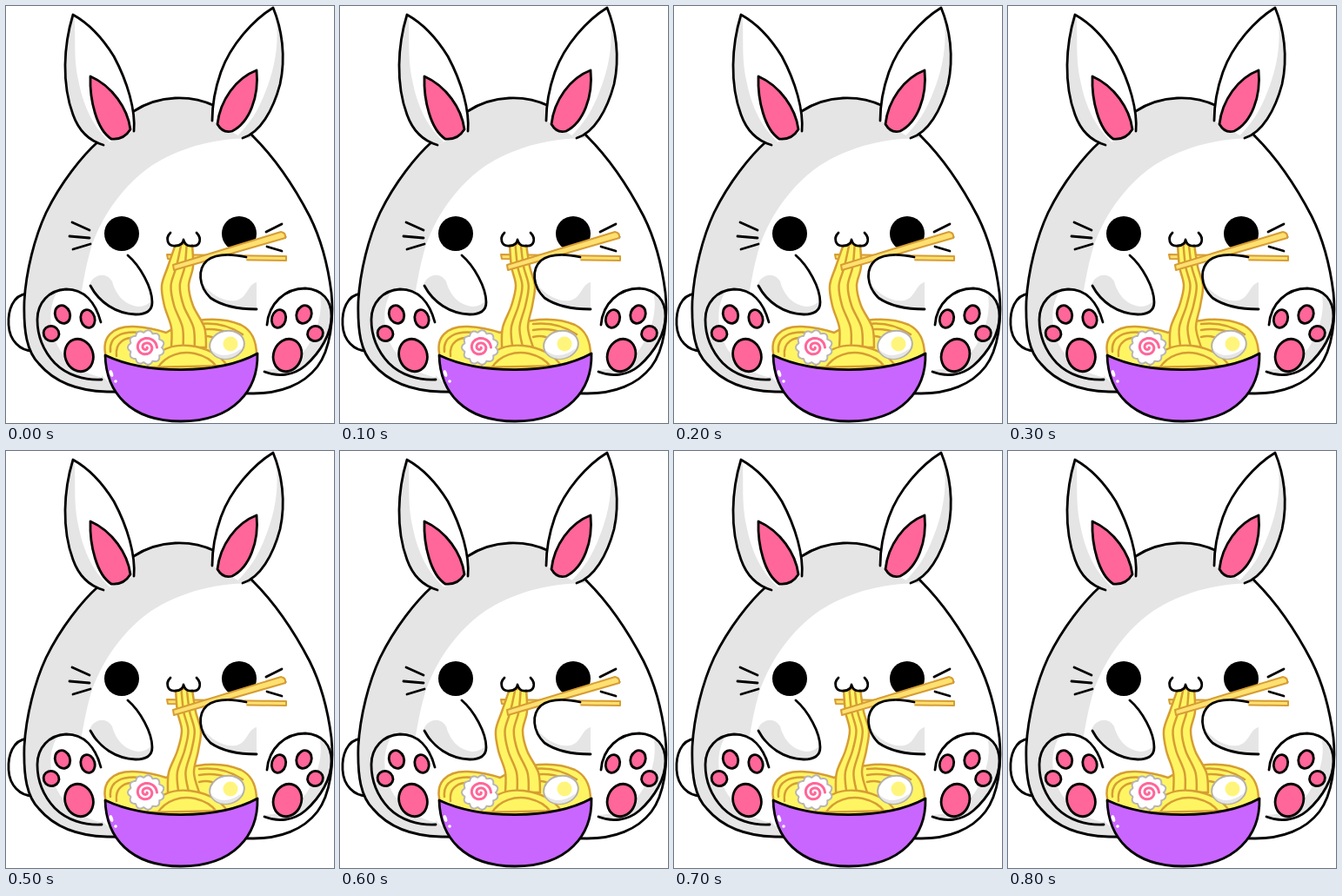
Recreate the animation shown at these times as an HTML page. Size 377 px wide and 480 px high, loop 900 ms.

```html
<!DOCTYPE html>
<html lang="en">
<head>
<meta charset="utf-8">
<title>Bunny eating noodles</title>
<style>
  html, body { margin: 0; width: 100%; height: 100%; overflow: hidden; background: #fff; }
  svg { display: block; width: 100vw; height: 100vh; }
  .ink { stroke: #000; stroke-width: 2.8; stroke-linecap: round; stroke-linejoin: round; }
  .line { fill: none; }
  .white { fill: #fff; }
  .shade { fill: #e5e5e5; }
  .pink { fill: #ff6699; }
  .gold { stroke: #d69d33; stroke-width: 2.5; stroke-linecap: round; stroke-linejoin: round; }
  .pasta { fill: #fff563; }
  .wood { fill: #ffe070; stroke-width: 2; }
</style>
</head>
<body>
<svg viewBox="0 0 377 480">
  <defs>
    <path id="body" d="M106 156 C119 143 132 130 147 121 C176 102 213 102 240 115 C258 123 272 136 284 150 C314 180 336 217 349 242 C362 268 370 298 374 330 C377 360 373 395 358 415 C342 436 315 446 284 446 L116 444 C80 443 55 432 38 412 C24 398 20 375 21 340 C23 305 33 266 46 238 C63 203 88 172 106 156Z"/>
    <path id="earL" d="M112 160 C95 155 83 142 77 125 C64 90 66 46 77 10 C95 20 111 37 124 58 C140 88 149 120 147 144"/>
    <path id="earR" d="M237 132 C237 116 240 96 247 76 C258 45 284 16 307 2 C317 26 322 58 315 90 C307 120 292 146 272 152"/>
    <path id="footL" d="M109 364 C103 341 90 326 69 326 C49 327 36 342 36 361 C36 382 43 397 56 411 C70 425 90 431 110 430"/>
    <path id="footR" d="M300 367 C302 342 321 325 344 325 C364 326 374 339 374 357 C374 377 362 398 344 414 C330 426 312 427 297 421"/>
    <path id="bowl" d="M114 402 C160 424 243 425 289 400 C290 442 262 478 201 478 C143 478 115 445 114 402Z"/>
    <path id="armL" d="M140 287 C154 299 168 324 168 341 C168 351 161 355 149 355 C126 354 107 341 97 322"/>
    <path id="armR" d="M276 289 C262 286 243 284 231 293 C220 303 221 322 235 336 C248 345 268 349 288 349"/>
    <clipPath id="inBody"><use href="#body"/></clipPath>
    <clipPath id="inEarL"><use href="#earL"/></clipPath>
    <clipPath id="inEarR"><use href="#earR"/></clipPath>
    <clipPath id="inFootL"><use href="#footL"/></clipPath>
    <clipPath id="inFootR"><use href="#footR"/></clipPath>
  </defs>

  <!-- tail and body -->
  <path class="ink white" d="M24 331 C8 333 2 350 3 367 C4 385 16 397 31 397"/>
  <use href="#body" class="white"/>
  <path class="shade" clip-path="url(#inBody)" d="M0 90 H300 V153 C246 149 202 162 167 184 C128 211 104 254 96 285 C91 303 88 322 84 345 C84 385 98 420 125 438 V450 H0Z"/>
  <use href="#body" class="ink line"/>

  <!-- ears -->
  <use href="#earL" class="white"/>
  <path class="shade" clip-path="url(#inEarL)" d="M77 5 C82 20 76 53 83 85 C89 116 101 143 126 162 H55 V5Z"/>
  <path class="ink pink" d="M97 81 C96 108 104 142 121 153 C130 154 138 150 143 142 C140 118 122 92 97 81Z"/>
  <use href="#earL" class="ink line"/>
  <use href="#earR" class="white"/>
  <path class="shade" clip-path="url(#inEarR)" d="M308 0 C316 35 310 70 298 99 C290 121 278 139 261 154 H330 V0Z"/>
  <path class="ink pink" d="M288 74 C264 83 246 109 243 136 C247 143 253 146 260 144 C280 134 291 104 288 74Z"/>
  <use href="#earR" class="ink line"/>

  <!-- face -->
  <path class="ink line" d="M76 249 L96 258 M73 265 L96 267 M77 280 L97 274 M299 260 L317 251 M300 268 L321 266 M300 277 L317 282"/>
  <g id="open"><circle cx="133" cy="262" r="20"/><circle cx="268" cy="262" r="20"/></g>
  <path id="shut" fill="none" stroke="#000" stroke-width="5" stroke-linecap="round" d="M114 263 Q133 249 153 261 M249 262 Q268 249 287 262"/>

  <!-- left arm -->
  <use href="#armL" class="white"/>
  <path class="shade" d="M96 321 C100 309 115 305 122 317 C126 332 136 344 152 346 Q162 346 168 338 C169 351 161 355 149 355 C126 354 107 341 96 321Z"/>
  <use href="#armL" class="ink line"/>

  <!-- feet -->
  <use href="#footL" class="white"/>
  <path class="shade" clip-path="url(#inFootL)" d="M30 322 H64 C46 342 48 378 65 400 Q82 422 112 428 V436 H30Z"/>
  <use href="#footL" class="ink line"/>
  <use href="#footR" class="white"/>
  <path class="shade" clip-path="url(#inFootR)" d="M358 322 C369 350 354 388 336 405 Q322 418 296 419 V435 H380 V322Z"/>
  <use href="#footR" class="ink line"/>
  <g id="pads" class="ink pink"></g>

  <!-- noodle heap and rear chopstick -->
  <path class="gold pasta" d="M115 404 C109 382 122 368 147 369 Q166 370 184 376 C211 358 247 357 270 367 Q288 376 288 402 C243 424 160 424 115 404Z"/>
  <path class="gold line" d="M120 398 C118 380 134 374 154 376 M127 403 C125 386 138 381 150 382 M222 366 Q250 363 272 378 M222 373 Q240 370 255 376 M222 381 Q234 378 242 384"/>
  <path class="gold wood" d="M185 286 L322 288 V293 L186 291Z"/>
  <g id="strand" class="gold">
    <path class="pasta"/><path class="line"/><path class="line"/>
  </g>
  <g class="gold">
    <path class="pasta" d="M162 416 C173 395 192 389 211 391 C230 393 247 402 254 414Z"/>
    <path class="line" d="M174 417 C184 401 202 397 217 400 Q234 404 242 415"/>
  </g>

  <!-- toppings -->
  <path id="cake" class="white" stroke="#b9b4b6" stroke-width="2"/>
  <path id="swirl" fill="none" stroke="#ff6699" stroke-width="3" stroke-linecap="round"/>
  <ellipse cx="254" cy="390" rx="20" ry="16" class="white" stroke="#b5b0a8" stroke-width="2" transform="rotate(-12 254 390)"/>
  <path class="shade" d="M236 396 Q251 409 271 394 Q265 406 251 406 Q240 405 236 396Z"/>
  <circle cx="258" cy="389" r="8.5" fill="#fff57c"/>

  <!-- bowl -->
  <use href="#bowl" class="ink" fill="#c966ff"/>
  <g class="white"><ellipse cx="121" cy="423" rx="2" ry="4" transform="rotate(-18 121 423)"/><circle cx="126" cy="432" r="1.8"/></g>

  <!-- front chopstick, hand and mouth -->
  <path class="gold wood" d="M192 298 L316 260 Q322 261 321 267 L193 304Z"/>
  <path class="white" d="M276 289 C262 286 243 284 231 293 C220 303 221 322 235 336 C248 345 268 349 288 349 V316 Q276 304 276 289Z"/>
  <path class="shade" d="M226 320 C236 332 250 341 264 339 C277 337 278 320 288 318 V349 C268 349 248 345 235 336 Q228 329 226 320Z"/>
  <use href="#armR" class="ink line"/>
  <path class="ink white" d="M189 261 C183 267 185 277 195 276 C201 276 204 272 204 269 C205 273 208 277 214 276 C224 277 225 267 219 261"/>
</svg>
<script>
const $ = id => document.getElementById(id);

// Toe pads: x, y, rx, ry, tilt; the right foot mirrors the left.
const pads = [[65, 355, 8.5, 10.5, -20], [94, 360, 8, 10.5, -15], [52, 377, 9, 8.5, 25], [84, 402, 16, 19, -20]];
const ellipse = (x, y, rx, ry, a) =>
  `<ellipse cx="${x}" cy="${y}" rx="${rx}" ry="${ry}" transform="rotate(${a} ${x} ${y})"/>`;
$("pads").innerHTML = pads.map(([x, y, rx, ry, a]) =>
  ellipse(x, y, rx, ry, a) + ellipse(407.5 - x, y, rx, ry, -a)).join("");

// Scalloped fish cake with its spiral.
const polar = (n, turns, radius) => "M" + Array.from({ length: n + 1 }, (_, i) => {
  const u = i / n, a = u * turns * 2 * Math.PI, r = radius(u, a);
  return `${(161 + r * Math.cos(a)).toFixed(1)} ${(393 + r * 0.95 * Math.sin(a)).toFixed(1)}`;
}).join("L");
$("cake").setAttribute("d", polar(120, 1, (u, a) => 18 + 3 * Math.abs(Math.sin(a * 5.5))) + "Z");
$("swirl").setAttribute("d", polar(60, 2, u => 1 + 11.5 * u));

// Noodle strand: left and right edges at each height, for both swings.
const rows = [274, 300, 322, 345, 370, 393];
const poses = [
  { left: [195, 186, 179, 182, 190, 190], right: [214, 215, 210, 215, 228, 230] },
  { left: [195, 197, 202, 197, 187, 186], right: [214, 218, 224, 221, 216, 222] }
];

// Smooth curve through the points.
function curve(pts) {
  let d = "";
  for (let i = 0; i < pts.length - 1; i++) {
    const p = pts[Math.max(i - 1, 0)], a = pts[i], b = pts[i + 1], q = pts[Math.min(i + 2, pts.length - 1)];
    d += `C${a[0] + (b[0] - p[0]) / 6} ${a[1] + (b[1] - p[1]) / 6} ` +
         `${b[0] - (q[0] - a[0]) / 6} ${b[1] - (q[1] - a[1]) / 6} ${b[0]} ${b[1]}`;
  }
  return d;
}

const edge = (pose, k) => rows.map((y, i) => [pose.left[i] + (pose.right[i] - pose.left[i]) * k, y]);

function strandPaths(pose) {
  const l = edge(pose, 0), r = edge(pose, 1).reverse();
  const inner = k => { const e = edge(pose, k); return `M${e[0]}` + curve(e); };
  return [`M${l[0]}${curve(l)}L${r[0]}${curve(r)}Z`, inner(0.34), inner(0.67)];
}

const shapes = poses.map(strandPaths);
const strand = [...$("strand").children];

// The strand swings every 100 ms; the eyes shut for one beat mid-loop.
function draw(t) {
  const beat = Math.floor((t % 900) / 100);
  const shut = beat === 4;
  shapes[beat % 2].forEach((d, i) => strand[i].setAttribute("d", d));
  $("open").style.display = shut ? "none" : "";
  $("shut").style.display = shut ? "" : "none";
}

const start = performance.now();
function tick() {
  draw(performance.now() - start);
  requestAnimationFrame(tick);
}
tick();
</script>
</body>
</html>
```
